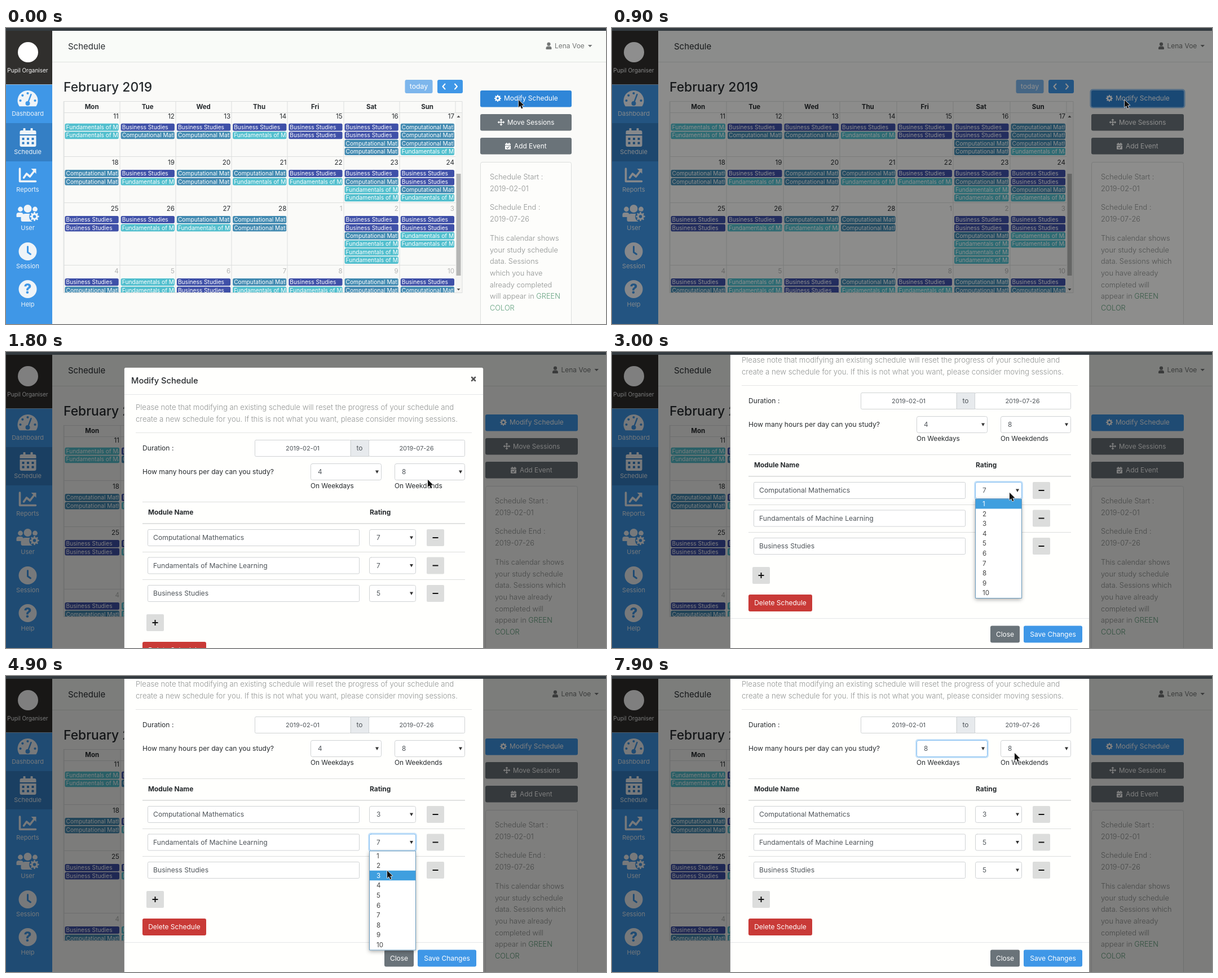
Write an HTML page with a canvas that moves like this. It is 1064 px wide and 526 px high and loops after 8 s.

```html
<!DOCTYPE html>
<html lang="en">
<head>
<meta charset="utf-8">
<title>Schedule</title>
<style>
  html, body { margin: 0; width: 100%; height: 100%; overflow: hidden; background: #fafaf8; }
  canvas { position: absolute; left: 0; top: 0; }
</style>
</head>
<body>
<script>
const W = 1064, H = 526, LOOP = 8000, STEP = 100, ITEM = 17.6;
const BLUE = '#3f97e7', GREY = '#6a7379', INK = '#272b2e', LINE = '#dcdedd', ICON = '#eff4f8';

const layer = () => {
  const el = document.body.appendChild(document.createElement('canvas'));
  el.width = W;
  el.height = H;
  return el.getContext('2d');
};
const page = layer(), dialog = layer(), top_ = layer();
let c = page;

// ---------- drawing helpers ----------
function box(x, y, w, h, fill, r = 0, stroke) {
  c.beginPath();
  c.roundRect(x, y, w, h, r);
  if (fill) { c.fillStyle = fill; c.fill(); }
  if (stroke) { c.strokeStyle = stroke; c.lineWidth = 1; c.stroke(); }
}
function text(s, x, y, size, color = INK, weight = 400, align = 'left') {
  c.font = `${weight} ${size}px Inter, "Open Sans", sans-serif`;
  c.textAlign = align;
  c.fillStyle = color;
  c.fillText(s, x, y + size * 0.35);
  return c.measureText(s).width;
}
function disc(x, y, r, fill) {
  c.beginPath();
  c.arc(x, y, r, 0, 7);
  c.fillStyle = fill;
  c.fill();
}
function poly(pts, fill) {
  c.beginPath();
  pts.forEach(p => c.lineTo(...p));
  c.closePath();
  c.fillStyle = fill;
  c.fill();
}
function path(pts, color, width) {
  c.beginPath();
  pts.forEach(p => c.lineTo(...p));
  c.strokeStyle = color;
  c.lineWidth = width;
  c.lineCap = c.lineJoin = 'round';
  c.stroke();
}
const rule = (x, y, w, color = LINE, h = 1) => box(x, y, w, h, color);

// ---------- icons ----------
function cog(x, y, r, fill, hole) {
  for (let i = 0; i < 8; i++) {
    const a = i * Math.PI / 4, dx = Math.cos(a), dy = Math.sin(a);
    path([[x, y], [x + dx * r * 0.85, y + dy * r * 0.85]], fill, r * 0.36);
  }
  disc(x, y, r * 0.76, fill);
  disc(x, y, r * 0.34, hole);
}
function gauge(x, y) {
  c.beginPath();
  c.arc(x, y + 3, 18, 2.53, 0.61);
  c.closePath();
  c.fillStyle = ICON;
  c.fill();
  [Math.PI, 3.93, 4.71, 0].forEach(a => disc(x + 13 * Math.cos(a), y + 3 + 13 * Math.sin(a), 2.1, BLUE));
  path([[x, y + 8], [x + 6, y - 8]], BLUE, 2.4);
  disc(x, y + 8, 4, BLUE);
}
function calendarIcon(x, y, hole) {
  box(x - 14, y - 12, 29, 7, ICON, [3, 3, 0, 0]);
  [-8, 5].forEach(d => box(x + d, y - 16, 4, 6, ICON, 1));
  box(x - 14, y - 3, 29, 20, ICON, [0, 0, 3, 3]);
  for (let i = 0; i < 6; i++) box(x - 10 + i % 3 * 8.5, y + 1 + (i > 2) * 7.5, 4, 4, hole, 0.6);
}
function chart(x, y) {
  path([[x - 14, y - 12], [x - 14, y + 10.5], [x + 14, y + 10.5]], ICON, 3.6);
  path([[x - 7, y + 4], [x - 2, y - 3], [x + 4, y + 2], [x + 11, y - 7]], ICON, 3.6);
  poly([[x + 6, y - 12], [x + 15, y - 12], [x + 15, y - 3]], ICON);
}
function team(x, y) {
  [-13, 13].forEach(d => disc(x + d, y - 8, 4.4, ICON));
  disc(x, y - 9, 7, ICON);
  box(x - 20, y - 2, 12, 8, ICON, [4, 4, 0, 1]);
  box(x - 12, y, 20, 14, ICON, [7, 4, 1, 3]);
  disc(x + 12, y + 5, 9.5, BLUE);
  cog(x + 12, y + 5, 8, ICON, BLUE);
}
function clock(x, y) {
  disc(x, y, 16, ICON);
  path([[x, y - 8.5], [x, y + 1.5], [x + 5, y + 5]], BLUE, 3);
}
function help(x, y) {
  disc(x, y, 16, ICON);
  text('?', x, y, 24, BLUE, 800, 'center');
}
function arrows(x, y) {
  path([[x - 4, y], [x + 4, y]], '#fff', 1.5);
  path([[x, y - 4], [x, y + 4]], '#fff', 1.5);
  for (const [dx, dy] of [[1, 0], [-1, 0], [0, 1], [0, -1]])
    poly([[x + dx * 6.3, y + dy * 6.3], [x + dx * 3.5 + dy * 2.6, y + dy * 3.5 + dx * 2.6],
          [x + dx * 3.5 - dy * 2.6, y + dy * 3.5 - dx * 2.6]], '#fff');
}
function checkDay(x, y) {
  box(x - 5, y - 4.5, 10, 2.5, '#fff', 1);
  [-3, 1.5].forEach(d => box(x + d, y - 6, 1.6, 3, '#fff'));
  box(x - 5, y - 1.2, 10, 7, '#fff', 1);
  path([[x - 2.2, y + 2.2], [x - 0.6, y + 3.8], [x + 2.4, y + 0.7]], GREY, 1.2);
}

// ---------- page ----------
const SUBJECT = {
  B: ['Business Studies', '#3f50a8'],
  C: ['Computational Mathematics', '#428ab1'],
  F: ['Fundamentals of Machine Learning', '#52bfce'],
};
const WEEKS = [
  [145.8, 11, 'FF BC BC BF BB BBCC CCCF'],
  [228, 18, 'CC BF CC CF BF BCFF BBCF'],
  [310, 25, 'BB BF CF CC - BBCFFF BBFF'],
  [421, 32, 'BC FF BB CF BF CC BC'],
];
const NAV = [['Dashboard', gauge], ['Schedule', calendarIcon], ['Reports', chart],
             ['User', team], ['Session', clock], ['Help', help]];

function sidebar() {
  box(0, 5, 82, 96, '#302f2d');
  disc(39, 43, 18, '#fff');
  text('Pupil Organiser', 38.5, 75.5, 10, '#f4f4f4', 400, 'center');
  box(0, 101, 82, 425, BLUE);
  rule(0, 100, 82, '#9db7cf');
  box(0, 169, 82, 68, '#347fc5');
  NAV.forEach(([name, icon], i) => {
    icon(38.5, [126, 194, 262, 330, 397, 464][i], '#347fc5');
    text(name, 38.5, 152 + i * 67.8, 11, ICON, 400, 'center');
  });
}

function calendar(right) {
  const left = 102.5, cw = (right - 12 - left) / 7;
  text('February 2019', 102, 105, 22.9, INK, 500);
  box(right - 101.5, 92, 49, 24, '#7db6ec', 3);
  text('today', right - 77, 104, 12.3, '#fff', 400, 'center');
  box(right - 44, 92, 45, 24, BLUE, 3);
  path([[right - 30.5, 99.5], [right - 34.5, 104], [right - 30.5, 108.5]], '#fff', 2);
  path([[right - 13, 99.5], [right - 9, 104], [right - 13, 108.5]], '#fff', 2);

  c.save();
  c.beginPath();
  c.rect(left, 150, right - left, 321);
  c.clip();
  for (const [y, first, cells] of WEEKS) {
    rule(left, y, right - 12 - left);
    cells.split(' ').forEach((codes, d) => {
      const x = left + d * cw, day = first + d, next = day > 28;
      text(next ? day - 28 : day, x + cw - 2, y + 10.8, 11.6, next ? '#b4b5b4' : INK, 400, 'right');
      if (codes === '-') return;
      [...codes].forEach((k, i) => {
        const [name, color] = SUBJECT[k], ey = y + 24 + i * 14.4;
        box(x + 2, ey, cw - 4, 13, color, 2.5);
        c.save();
        c.beginPath();
        c.rect(x + 2, ey, cw - 5, 13);
        c.clip();
        text(name, x + 4, ey + 6.6, 10.2, '#fff');
        c.restore();
      });
    });
  }
  box(right - 12, 150, 12, 321, '#f5f5f3');
  box(right - 10.5, 259, 8, 181, '#b5b6b5');
  poly([[right - 9.5, 159], [right - 3.5, 159], [right - 6.5, 155.5]], '#555');
  poly([[right - 9.5, 463], [right - 3.5, 463], [right - 6.5, 466.5]], '#555');
  c.restore();

  for (let d = 0; d <= 7; d++) {
    const x = Math.round(left + d * cw) - 0.5;
    box(x, 130, 1, d === 7 ? 20 : 341, LINE);
    if (d < 7) text(['Mon', 'Tue', 'Wed', 'Thu', 'Fri', 'Sat', 'Sun'][d], x + cw / 2, 140, 11.5, INK, 700, 'center');
  }
  box(left, 130.5, right - left, 340, null, 0, LINE);
  rule(left, 150, right - left);
}

function sidePanel(x, w, wide, t) {
  const mid = x + w / 2;
  if (t >= 700 && t < 1500) box(x - 2.5, 108.5, w + 5, 34, '#8fc1f0', 5);
  box(x, 111, w, 29.5, t < 700 ? '#2f86d8' : t < 1500 ? '#2c80cf' : BLUE, 3);
  cog(mid - 50, 125, 6, '#fff', '#2f86d8');
  text('Modify Schedule', mid - 39, 125, 12, '#fff');
  box(x, 153, w, 29.5, GREY, 3);
  arrows(mid - 44, 167.5);
  text('Move Sessions', mid - 33, 167.5, 11.7, '#fff');
  box(x, 195, w, 29.5, GREY, 3);
  checkDay(mid - 32, 210);
  text('Add Event', mid - 21, 210, 11.9, '#fff');

  box(x + 0.5, 238.5, w - 1, 300, '#fdfdfb', 3, LINE);
  const put = (s, y, color = '#8d908f', dx = 17) => text(s, x + dx, y, 12.8, color, 300);
  put('Schedule Start :', 265);
  put('2019-02-01', 285.5);
  put('Schedule End :', 319);
  put('2019-07-26', 339.5);
  const lines = ['This calendar shows', 'your study schedule'].concat(wide
    ? ['data. Sessions which', 'you have already', 'completed will', 'appear in ']
    : ['data. Sessions', 'which you have', 'already completed', 'will appear in ']);
  let end = 0;
  lines.forEach((s, i) => end = put(s, 373.5 + i * 20.7));
  put('GREEN', 477, '#5f9f7c', 17 + end);
  put('COLOR', 497.5, '#5f9f7c');
}

function drawPage(t) {
  const wide = t >= 800, dx = wide ? 11.5 : 0;
  c = page;
  box(0, 0, W, H, '#fafaf8');
  box(82, 5, W, 55, '#f9fbf8');
  rule(82, 60, W, '#e0e3df');
  text('Schedule', 110, 32.5, 15, INK, 400);
  disc(962.5 + dx, 28.7, 3.1, '#747776');
  box(957.5 + dx, 32.5, 10, 5.5, '#747776', [3.5, 3.5, 1, 1]);
  text('Lena Voe', 973 + dx, 32, 12, '#747776');
  poly([[1032 + dx, 30], [1039.5 + dx, 30], [1035.7 + dx, 34]], '#747776');
  sidebar();
  calendar(wide ? 818 : 809);
  sidePanel(wide ? 850 : 841, wide ? 164 : 162, wide, t);
  const dim = Math.min(0.5, Math.max(0, (t - 767) / 300));
  box(0, 0, W, H, `rgba(0,0,0,${dim})`);
}

// ---------- dialog ----------
function field(x, y, w, s, align = 'left') {
  box(x + 0.5, y - 14.5, w, 29, '#fff', 2, '#cfd2d4');
  text(s, align === 'left' ? x + 10 : x + w / 2, y, align === 'left' ? 12.2 : 11, '#50565b', 400, align);
}
function select(x, y, w, value, focus) {
  if (focus) box(x - 2, y - 17, w + 5, 34, '#c9e3f9', 5);
  box(x + 0.5, y - 14.5, w, 29, '#fff', 3, focus ? '#7fbcf0' : '#cfd2d4');
  text(value, x + 13, y, 11.8, '#50565b');
  poly([[x + w - 10, y - 2.5], [x + w - 4, y - 2.5], [x + w - 7, y + 3]], '#333');
}
function menu(x, y, w, options, cy) {
  const h = options.length * ITEM + 1;
  const hot = Math.min(options.length - 1, Math.max(0, Math.floor((cy - y) / ITEM)));
  c.save();
  c.shadowColor = 'rgba(0,0,0,.35)';
  c.shadowBlur = 7;
  c.shadowOffsetY = 2;
  box(x, y, w, h, '#fff');
  c.restore();
  box(x, y + hot * ITEM, w, ITEM, '#3f9fdf');
  options.forEach((s, i) => text(s, x + 13, y + 9 + i * ITEM, 11.6, i === hot ? '#fff' : '#444'));
  box(x + 0.5, y + 0.5, w, h - 1, null, 0, '#6699bd');
}
function button(x, y, w, s, color) {
  box(x, y - 15, w, 30, color, 3);
  text(s, x + w / 2, y, 12, '#fff', 400, 'center');
}
function squareButton(x, y, plus) {
  box(x, y - 15, 31, 30, '#dcdddc', 2);
  box(x + 10.5, y - 1, 10, 2, '#111');
  if (plus) box(x + 14.5, y - 5, 2, 10, '#111');
}

function drawDialog(t, cy) {
  c = dialog;
  c.clearRect(0, 0, W, H);
  if (t < 1100) return;
  c.canvas.style.opacity = t < 1200 ? 0.6 : 1;
  const p = Math.min(1, Math.max(0, (t - 1800) / 500));
  const dy = t < 1200 ? -74 : -Math.round(84 * p * (2 - p));
  c.save();
  c.translate(0, dy);
  box(209.5, 27.5, 637, 586, '#fffffd', 3, 'rgba(0,0,0,.25)');
  text('Modify Schedule', 222, 51, 14.7, INK, 500);
  path([[826, 45], [832, 51]], '#555', 2.6);
  path([[832, 45], [826, 51]], '#555', 2.6);
  rule(210, 75, 636, '#e4e6e7');
  text('Please note that modifying an existing schedule will reset the progress of your schedule and', 230, 98.5, 13.2, '#929594', 300);
  text('create a new schedule for you. If this is not what you want, please consider moving sessions.', 230, 119.5, 13.2, '#929594', 300);
  rule(230, 143, 596, '#e4e5e4');

  text('Duration :', 242, 171, 12.1);
  field(441, 171, 170, '2019-02-01', 'center');
  field(643, 171, 170, '2019-07-26', 'center');
  box(611.5, 156.5, 32, 29, '#e7eaed', 0, '#cfd2d4');
  text('to', 627, 171, 12, '#50565b', 400, 'center');
  text('How many hours per day can you study?', 242, 213, 12.1);
  select(540, 213, 125, t < 7100 ? 4 : 8, t >= 6200);
  select(689, 213, 124, 8);
  text('On Weekdays', 540, 237.5, 11.8);
  text('On Weekdends', 689, 237.5, 11.8);

  rule(242, 266, 572);
  text('Module Name', 252, 285, 11.9, INK, 700);
  text('Rating', 645, 285, 11.9, INK, 700);
  rule(242, 304, 572, LINE, 1.7);
  const ratings = [t < 3600 ? 7 : 3, t < 5300 ? 7 : 5, 5];
  const focus = t >= 6200 ? -1 : t >= 4300 ? 1 : t >= 2900 ? 0 : -1;
  ['C', 'F', 'B'].forEach((k, i) => {
    const y = 330 + i * 49.5;
    if (i) rule(242, Math.round(y - 25), 572);
    field(251, y, 375, SUBJECT[k][0]);
    select(644, y, 82, ratings[i], focus === i);
    squareButton(746, y);
  });
  squareButton(249, 481, true);
  button(242, 530, 113, 'Delete Schedule', '#c93a37');
  rule(210, 557, 636, '#e4e6e7');
  button(671, 585.5, 52, 'Close', GREY);
  button(730, 585.5, 104, 'Save Changes', BLUE);
  c.restore();

  const tenths = Array.from({ length: 10 }, (_, i) => i + 1);
  if (t >= 2900 && t < 3600) menu(644, 261, 82, tenths, cy);
  if (t >= 4400 && t < 5300) menu(644, 310.5, 82, tenths, cy);
  if (t >= 6400 && t < 7100) menu(540, 144, 125, [2, 4, 6, 8, 10, 12], cy);
}

// ---------- pointer: time, x, y ----------
const TRACK = [
  [0, 909, 128], [1400, 909, 128], [1600, 864, 190], [1700, 864, 190], [1800, 748, 227],
  [2400, 748, 227], [2700, 706, 244], [2800, 706, 244], [3000, 705, 250], [3100, 705, 250],
  [3300, 690, 307], [4000, 690, 307], [4400, 700, 296], [4700, 690, 312], [4800, 690, 312],
  [4900, 676, 346], [5100, 676, 384], [5500, 676, 384], [5700, 694, 267], [5800, 694, 267],
  [6300, 655, 135], [6500, 657, 152], [6600, 657, 152], [6800, 662, 199], [7000, 662, 199],
  [7300, 586, 182], [7400, 586, 182], [7900, 714, 137],
];
function pointer(t) {
  const i = TRACK.findIndex(k => k[0] >= t);
  if (i < 1) return TRACK[0].slice(1);
  const [t0, x0, y0] = TRACK[i - 1], [t1, x1, y1] = TRACK[i], p = (t - t0) / (t1 - t0);
  return [x0 + (x1 - x0) * p, y0 + (y1 - y0) * p];
}
function drawTop(x, y) {
  c = top_;
  c.clearRect(0, 0, W, H);
  box(0, 0, W, 5, '#343b40');
  const arrow = [[0, 0], [0, 13], [3, 10.3], [5.2, 15.2], [7.4, 14.2], [5.3, 9.4], [9.3, 9.2]]
    .map(([a, b]) => [x + a, y + b]);
  path([...arrow, arrow[0]], '#e8e8e8', 1.6);
  poly(arrow, '#111');
}

let shown = -1;
function frame(now) {
  const t = Math.floor(now % LOOP / STEP) * STEP;
  if (t !== shown) {
    shown = t;
    const [x, y] = pointer(t);
    drawPage(t);
    drawDialog(t, y);
    drawTop(x, y);
  }
  requestAnimationFrame(frame);
}
frame(0);
</script>
</body>
</html>
```
